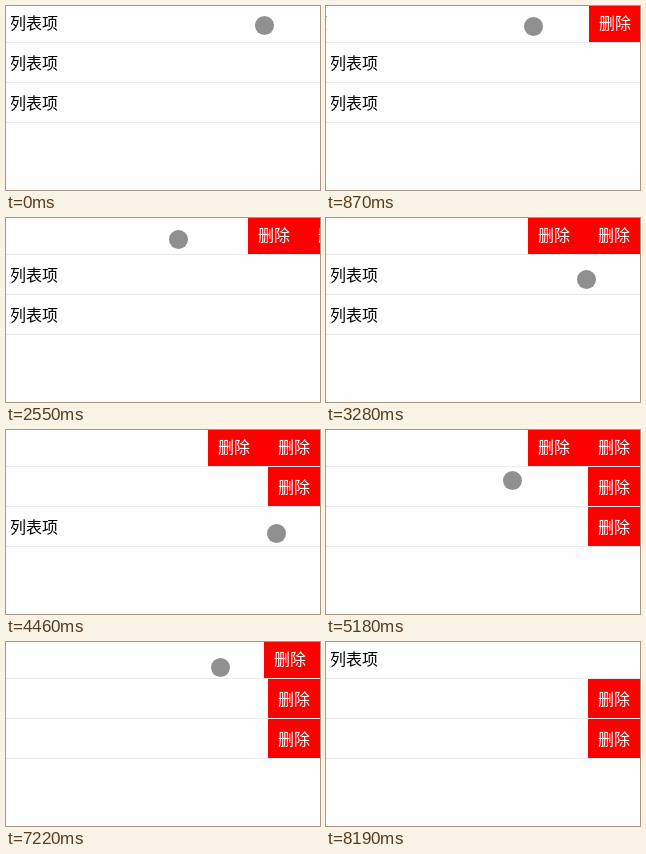
An HTML page for the animation above (8810 ms loop, 314 px wide and 184 px high).

```html
<!DOCTYPE html>
<html lang="zh-CN">
<head>
<meta charset="utf-8">
<title>滑动删除</title>
<style>
  html, body { margin: 0; width: 100%; height: 100%; overflow: hidden; background: #fefefe; }
  .stage { position: relative; width: 314px; height: 184px; overflow: hidden;
    font: 350 16px/39px "Noto Sans CJK SC", "Noto Sans CJK", sans-serif; color: #000; }
  .list { position: absolute; top: -3px; left: 0; width: 314px; }
  .row { height: 39px; overflow: hidden; border-bottom: 1px solid #eaeaea; }
  .slide { position: relative; height: 39px; padding-left: 4px; white-space: nowrap; }
  .actions { position: absolute; left: 100%; top: 0; height: 39px; display: flex; gap: 8px;
    background: #f00; color: #fff; }
  .actions span { padding: 0 10px; }
  .touch { position: absolute; left: 0; top: 0; width: 19px; height: 19px;
    border-radius: 50%; background: #909090; }
</style>
</head>
<body>
<div class="stage">
  <div class="list"></div>
  <div class="touch"></div>
</div>
<script>
  const LOOP = 8810, BEAT = 120, LAG = 8, RADIUS = 9.5;

  const list = document.querySelector('.list');
  const touch = document.querySelector('.touch');
  for (const buttons of [2, 1, 1]) {
    list.insertAdjacentHTML('beforeend', `<div class="row"><div class="slide">列表项<div class="actions">${
      '<span>删除</span>'.repeat(buttons)}</div></div></div>`);
  }
  const slides = [...list.querySelectorAll('.slide')];
  const widths = slides.map(slide => slide.lastElementChild.offsetWidth);

  // A swipe drags a row between two beats; a stop only guides the finger.
  const swipe = (row, start, end, from, to) => ({ row, start, end, from, to });
  const stop = (at, point) => swipe(null, at, at, point, point);
  const strokes = [
    swipe(0, 5, 10, [258.5, 19.5], [131.5, 21.5]),
    swipe(0, 15, 23, [131.5, 21.5], [185.5, 21.5]),
    swipe(1, 27, 31, [260.5, 61.5], [204.5, 66.5]),
    swipe(2, 37, 39, [270.5, 103.5], [214.5, 108.5]),
    swipe(0, 45, 50, [152.5, 21.5], [206.5, 21.5]),
    stop(51, [240.5, 76.5]),
    stop(55, [206.5, 172.5]),
    swipe(0, 58, 62, [158.5, 24.5], [270.5, 26.5]),
    stop(63, [270.5, 29.5]),
    stop(67, [301.5, 179.5])
  ];
  const lifted = [[52, 55], [64, 67], [68, Infinity]];

  const mix = (a, b, k) => a + (b - a) * k;
  const clamp = (v, low, high) => Math.min(high, Math.max(low, v));

  function pose(beat) {
    const shift = slides.map(() => 0);
    let last = { end: 0, to: strokes[0].from };
    for (const s of strokes) {
      if (beat < s.start) {
        const k = (beat - last.end) / (s.start - last.end);
        return { shift, x: mix(last.to[0], s.from[0], k * k), y: mix(last.to[1], s.from[1], k) };
      }
      const k = clamp((beat - s.start) / (s.end - s.start || 1), 0, 1);
      const x = mix(s.from[0], s.to[0], k), y = mix(s.from[1], s.to[1], k);
      if (s.row !== null) {
        const width = widths[s.row];
        const pulled = clamp(shift[s.row] + s.from[0] - x, 0, width);
        // On release the row snaps to its nearer side.
        shift[s.row] = beat <= s.end ? pulled : pulled * 2 < width ? 0 : width;
      }
      if (beat <= s.end) return { shift, x, y };
      last = s;
    }
    return { shift, x: last.to[0], y: last.to[1] };
  }

  const begin = performance.now();
  function draw() {
    const time = (performance.now() - begin) % LOOP;
    const beat = Math.max(0, Math.floor((time - LAG) / BEAT));
    const { shift, x, y } = pose(beat);
    touch.style.transform = `translate(${Math.round(x - RADIUS)}px, ${Math.round(y - RADIUS)}px)`;
    touch.hidden = lifted.some(([from, to]) => beat >= from && beat < to);
    slides.forEach((slide, i) => {
      slide.style.transform = `translateX(${-Math.round(shift[i])}px)`;
    });
    requestAnimationFrame(draw);
  }
  draw();
</script>
</body>
</html>
```
